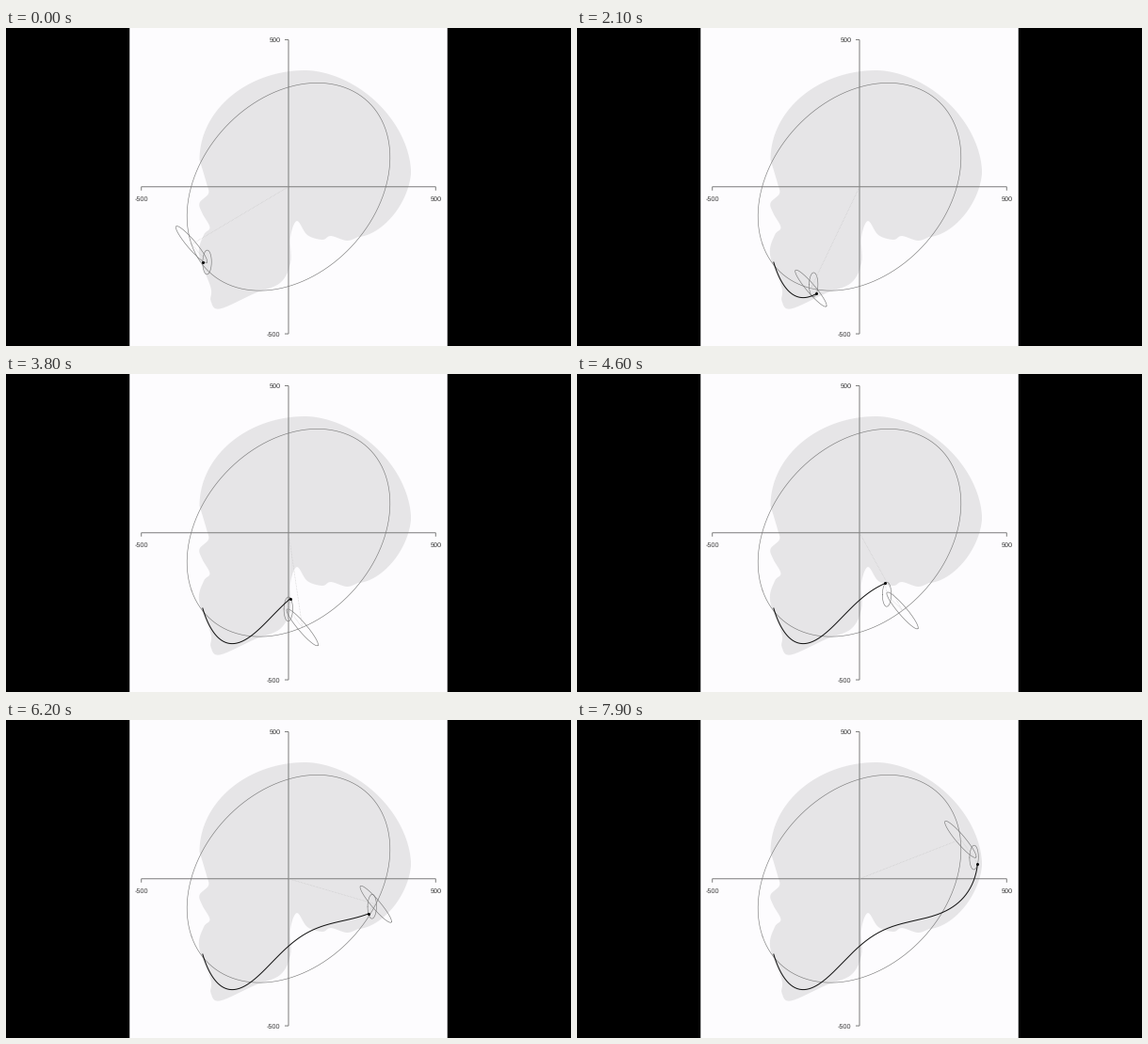
Recreate the animation shown at these times as a matplotlib script. Size 600 by 338 pixels, loop 8000 ms.

```python
import numpy as np
import matplotlib.pyplot as plt
from matplotlib.animation import FuncAnimation
from matplotlib.patches import Rectangle

plt.rcParams.update({"path.snap": False, "text.hinting": "none",
                     "font.family": "Liberation Sans"})

DPI = 64
PX = 72 / DPI  # points per pixel
FRAMES = 80
STEP = np.radians(2.145)
LAG = 0.4
CENTER = np.array([300.0, 168.75])
HALF = 156.3

# order, x radius, x phase, y radius, y phase (pixels, degrees, y down)
HARMONICS = [
    (1, 107.8, 197.2, 110.4, 303.7),
    (2, 16.7, -8, 19.5, 13),
    (3, 4.7, 178, 12.9, -90),
]

# key points of the skull base, jaw and face, from back to brow
FACE = [
    (374, 222), (362, 226), (345, 221), (336, 225), (320, 220), (309, 205),
    (302, 222), (302, 250), (291, 271), (264, 282), (227, 298.5),
    (217.5, 290), (217.5, 276), (205, 241), (210, 220), (216.5, 212),
    (208.5, 197), (205.5, 186), (215, 176), (213, 165), (205.5, 140),
]


def offset(harmonic, t):
    n, rx, px, ry, py = harmonic
    return np.array([rx * np.cos(n * t + np.radians(px)),
                     ry * np.cos(n * t + np.radians(py))])


def tip(t):
    return CENTER[:, None] + sum(offset(h, t) for h in HARMONICS)


def quarter(cx, cy, rx, ry, start, power=2.0):
    """Quarter of a superellipse, clockwise on screen."""
    a = np.radians(np.linspace(start, start + 90, 40))
    c, s = np.cos(a), np.sin(a)
    return np.column_stack([
        cx + rx * np.sign(c) * abs(c) ** (2 / power),
        cy + ry * np.sign(s) * abs(s) ** (2 / power)])


def smooth(points, per=8):
    """Open Catmull-Rom curve through the points."""
    p = np.pad(np.array(points, float), ((1, 1), (0, 0)), mode="edge")
    a, b, c, d = (p[k:len(p) - 3 + k, None] for k in range(4))
    u = np.linspace(0, 1, per)[None, :, None]
    curve = b + 0.5 * u * (c - a + u * (2 * a - 5 * b + 4 * c - d
                                        + u * (3 * (b - c) + d - a)))
    return curve.reshape(-1, 2)


def skull():
    return np.vstack([
        quarter(318, 140, 112.5, 95, 180),
        quarter(318, 153, 112, 108, 270, 1.8),
        quarter(374, 153, 56, 69, 0, 1.7),
        smooth(FACE),
    ])


fig = plt.figure(figsize=(600 / DPI, 338 / DPI), dpi=DPI, facecolor="black")
ax = fig.add_axes([0, 0, 1, 1])
ax.set(xlim=(0, 600), ylim=(338, 0))
ax.axis("off")


def stroke(xs=(), ys=(), color="#777777", width=0.6, **kw):
    return ax.plot(xs, ys, color=color, lw=width * PX, snap=False, **kw)[0]


def axis_line(xs, ys):
    stroke(xs, ys, "#7c7c7c", 1, solid_capstyle="butt")


def label(x, y, text, ha):
    ax.text(x, y, text, ha=ha, va="center_baseline", color="#333333",
            size=7.2 * PX)


ax.add_patch(Rectangle((131.25, 0), 337.5, 338, fc="#fdfcfe", lw=0,
                       snap=False))
ax.fill(*skull().T, color="#e6e5e7", lw=0)

cx, cy = CENTER
axis_line([cx - HALF, cx + HALF], [cy, cy])
axis_line([cx, cx], [cy - HALF, cy + HALF])
for sign in (-1, 1):
    x, y = cx + sign * HALF, cy - sign * HALF
    axis_line([x, x], [cy, cy + 4])
    axis_line([cx - 4, cx], [y, y])
    label(x, cy + 13, str(sign * 500), "center")
    label(cx - 8.5, y + 0.3, str(sign * 500), "right")

loop = np.linspace(0, 2 * np.pi, 241)
orbits = [stroke() for _ in HARMONICS]
arms = stroke(color="#c4c4c4", width=0.6, ls=(0, (1, 1.5)))
trace = stroke(color="#111111", width=1)
dot = stroke(color="black", marker="o", ms=3 * PX, mew=0)


def draw(i):
    t = STEP * max(0, i - LAG)
    joints = [CENTER]
    for h, orbit in zip(HARMONICS, orbits):
        orbit.set_data(*(joints[-1][:, None] + offset(h, loop / h[0])))
        joints.append(joints[-1] + offset(h, t))
    arms.set_data(*np.transpose(joints))
    trace.set_data(*tip(np.linspace(0, t, 2 * i + 2)))
    dot.set_data(*joints[-1][:, None])
    return [*orbits, arms, trace, dot]


anim = FuncAnimation(fig, draw, frames=FRAMES, interval=100,
                     repeat=True, repeat_delay=0, blit=False)
plt.show()
```
